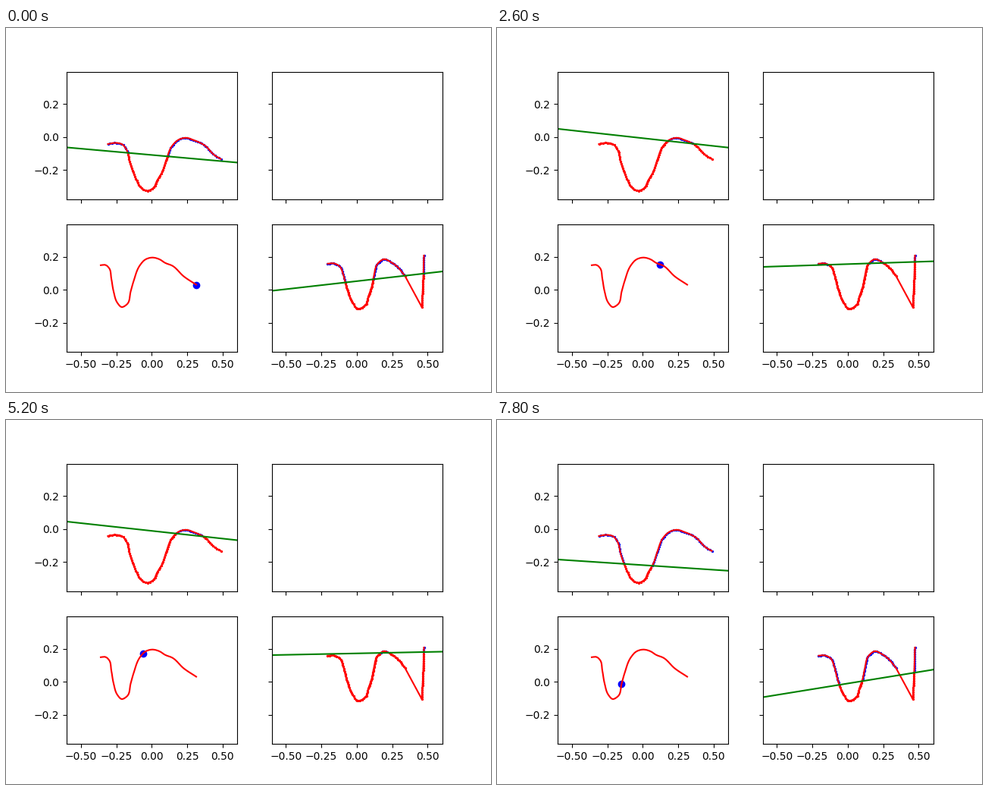
Animation of 640x480 px, one loop 8 s. Source, as a matplotlib script:

```python
import numpy as np
import matplotlib.pyplot as plt
from matplotlib.animation import FuncAnimation

FRAMES, STEP_MS = 40, 200
XLIM, YLIM = (-0.6005, 0.6045), (-0.377, 0.396)

# Key points of each outline, in stage pixels
SIDE = [(134, 152.5), (145, 151), (153, 153), (158, 159), (163, 177), (170, 196),
        (178, 210.5), (184, 214), (194, 210.5), (198.5, 201.5), (206, 188.5),
        (211, 173.5), (219, 154.5), (227, 147), (237, 144.3), (247, 147.3),
        (262, 154.5), (275, 167.5), (283, 172.2)]
PATH = [(250.5, 338), (234, 327), (219, 313), (209, 309), (203, 305), (192, 302.2),
        (183, 305), (176.5, 312), (168, 333), (164, 347), (159.5, 363.5), (152, 367.6),
        (146.5, 362), (141.5, 347), (138.5, 330), (135.5, 316), (131, 312), (124.5, 312.3)]
FRONT = [(424, 310.3), (432, 309.9), (440, 314), (444.5, 324.5), (448.5, 340), (456, 360),
         (463.5, 369.8), (474.5, 364), (477.5, 354), (482, 341), (485, 326.5),
         (489.5, 311), (498.5, 304.3), (507, 308), (515, 313.5), (526, 326.5)]
EDGE = [(548.2, 367.5), (550, 332), (551, 299.5)]

# Frame, distance the marker has gone, left height of the side and front cuts
MOTION = [(0, 0, 157, 346), (6, 19.8, 147.5, 333.5), (13, 44.8, 132.5, 314.5),
          (18, 59.4, 127.7, 306.5), (26, 83, 133.5, 309.5), (31, 98.4, 151.5, 328),
          (39, 126, 183.5, 365)]


def hermite(t, knots, values):
    """Smooth curve through values at knots, evaluated at t."""
    knots, values = np.asarray(knots, float), np.asarray(values, float)
    slopes = np.gradient(values, knots, axis=0)
    i = np.clip(np.searchsorted(knots, t, side="right") - 1, 0, len(knots) - 2)
    h = (knots[i + 1] - knots[i])[:, None]
    u = (t - knots[i])[:, None] / h
    return ((2 * u**3 - 3 * u**2 + 1) * values[i]
            + (3 * u**2 - 2 * u**3) * values[i + 1]
            + h * ((u**3 - 2 * u**2 + u) * slopes[i] + (u**3 - u**2) * slopes[i + 1]))


def lengths(points):
    """Distance along a path at each of its points."""
    return np.append(0, np.cumsum(np.hypot(*np.diff(points, axis=0).T)))


def sample(points, n):
    """n evenly spaced points on a smooth path."""
    dist = lengths(points)
    return hermite(np.linspace(0, dist[-1], n), dist, points)


def to_data(ax, pixels):
    """Stage pixel centres (y down) to data coordinates."""
    x, y = np.transpose(pixels)
    return ax.transData.inverted().transform(np.column_stack([x + 0.5, 479.5 - y]))


class CutView:
    """Outline whose points turn blue above a swinging green line."""

    def __init__(self, ax, outline, left, right, ratio):
        self.pts = to_data(ax, outline)
        right = right + ratio * (left - left[0])
        self.ends = [to_data(ax, [(ax.bbox.x0, a), (ax.bbox.x1, b)])
                     for a, b in zip(left, right)]
        self.above = ax.scatter([], [], s=2, c="blue")
        self.below = ax.scatter([], [], s=2, c="red")
        ax.plot(*self.pts.T, color="red")
        self.line, = ax.plot([], [], color="green")

    def show(self, i):
        (xa, ya), (xb, yb) = self.ends[i]
        x, y = self.pts.T
        high = y > ya + (yb - ya) * (x - xa) / (xb - xa)
        self.above.set_offsets(self.pts[high])
        self.below.set_offsets(self.pts[~high])
        self.line.set_data([xa, xb], [ya, yb])


fig, axes = plt.subplots(2, 2, sharex=True, sharey=True, figsize=(6.4, 4.8), dpi=100)
axes[0, 0].set(xlim=XLIM, ylim=YLIM)
side_ax, path_ax, front_ax = axes[0, 0], axes[1, 0], axes[1, 1]

keys = np.array(MOTION)
gone, side_left, front_left = hermite(np.arange(FRAMES), keys[:, 0], keys[:, 1:]).T

front_outline = np.vstack([sample(FRONT, 81), sample(EDGE, 24)])
views = [CutView(side_ax, sample(SIDE, 81), side_left, 177, 0.805),
         CutView(front_ax, front_outline, front_left, 320.5, 0.425)]

stops = to_data(path_ax, hermite(gone, lengths(PATH), PATH))
path_ax.plot(*to_data(path_ax, sample(PATH, 81)).T, color="red")
marker = path_ax.scatter([], [], c="blue")


def update(i):
    for view in views:
        view.show(i)
    marker.set_offsets(stops[i:i + 1])
    return []


anim = FuncAnimation(fig, update, frames=FRAMES, interval=STEP_MS,
                     repeat=True, repeat_delay=0, blit=False)
plt.show()
```
